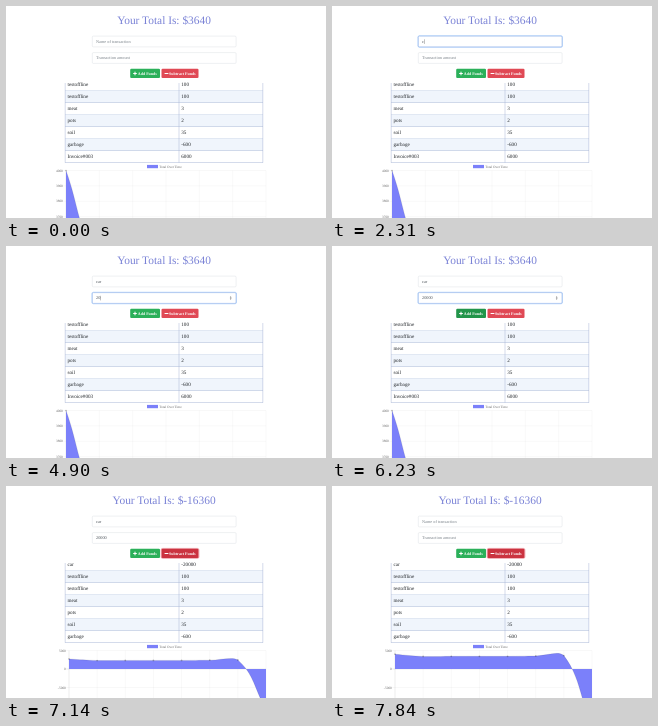
Animation, 320 px wide and 212 px high, one loop 8000 ms. Source, as an HTML page:

```html
<!DOCTYPE html>
<html lang="en">
<head>
<meta charset="utf-8">
<style>
  html, body { margin: 0; width: 100%; height: 100%; overflow: hidden; background: #fff; }
  svg { display: block; width: 100%; height: 100%; }
  text { font-family: "Liberation Serif", serif; text-rendering: geometricPrecision; white-space: pre; }
</style>
</head>
<body>
<svg id="stage" viewBox="0 0 320 212"></svg>
<script>
const LOOP = 8000, BLUR = 6790, POSTED = 6930, CLEARED = 7350;
const stage = document.getElementById('stage');

const clamp = v => Math.min(1, Math.max(0, v));
const between = (t, a, b) => t >= a && t < b;
const smooth = v => { v = clamp(v); return v * v * (3 - 2 * v); };
const focusLevel = (t, from, to) => smooth((t - from + 40) / 150) - smooth((t - to + 40) / 150);

const text = (x, y, size, fill, str, extra = '') =>
  `<text x="${x}" y="${y}" font-size="${size}" fill="${fill}" ${extra}>${str}</text>`;
const rect = (x, y, w, h, fill, extra = '') =>
  `<rect x="${x}" y="${y}" width="${w}" height="${h}" fill="${fill}" ${extra}/>`;
const path = (d, stroke, width, fill = 'none') =>
  `<path d="${d}" stroke="${stroke}" stroke-width="${width}" fill="${fill}"/>`;

// Number of characters typed so far, one per key time
const typed = (t, word, times) =>
  t >= CLEARED ? '' : word.slice(0, times.filter(k => t >= k).length);

function input(y, placeholder, value, focus, caret) {
  const advance = { c: .444, a: .444, r: .333 };
  const caretX = 90.1 + 4.28 * [...value].reduce((sum, ch) => sum + (advance[ch] || .5), 0);
  let out = '';
  if (focus > 0) out += rect(85.9, y - .4, 144.6, 11.6, 'none',
    `rx="1.5" stroke="#007bff" stroke-opacity="${.25 * focus}" stroke-width=".9"`);
  out += rect(86.3, y, 143.8, 10.8, '#fff', 'rx="1.1" stroke="#ced4da" stroke-width=".35"');
  if (focus > 0) out += rect(86.3, y, 143.8, 10.8, 'none',
    `rx="1.1" stroke="#80a8f0" stroke-opacity="${focus}" stroke-width=".5"`);
  out += text(90, y + 6.8, 4.28, value ? '#495057' : '#7b838a', value || placeholder);
  if (caret) out += rect(caretX, y + 3.2, .3, 4.6, '#333');
  return out;
}

function form(t) {
  const name = typed(t, 'car', [2310, 2520, 2730]);
  const amount = typed(t, '20000', [4550, 4900, 5040, 5180, 5390]);
  const nameCaret = between(t, 1610, 2170) || between(t, 2310, 3220);
  const amountCaret = between(t, 980, 1470) || between(t, 3220, 3780) ||
    between(t, 4340, 5880) || between(t, 6440, BLUR);
  const spinner = between(t, 980, 1680) || between(t, 2940, BLUR);
  return input(30.1, 'Name of transaction', name, focusLevel(t, 1610, 3220), nameCaret) +
    input(46.6, 'Transaction amount', amount,
      focusLevel(t, 980, 1610) + focusLevel(t, 3220, BLUR + 40), amountCaret) +
    (spinner ? path('M223.8 51.4l.9-1.1l.9 1.1zM223.8 52.6l.9 1.1l.9-1.1z', 'none', 0, '#666') : '');
}

function button(x, w, fill, label, icon, ring) {
  return (ring ? rect(x - .4, 62.4, w + .8, 10, 'none',
      'rx="1.5" stroke="#dc3545" stroke-opacity=".45" stroke-width=".9"') : '') +
    rect(x, 62.8, w, 9.2, fill, 'rx="1.1"') +
    path(icon, '#fff', 1) +
    text(x + 7.6, 68.8, 4, '#fff', label, 'font-weight="bold"');
}

function buttons(t) {
  const addHover = between(t, 6230, 6580), subHover = t >= 6580;
  return button(124.2, 29.8, addHover ? '#22954a' : '#2bb05a', 'Add Funds',
      'M127.2 67.5h3.6M129 65.7v3.6') +
    button(155.5, 37, subHover ? '#cb3340' : '#e04955', 'Subtract Funds',
      'M158.6 67.5h3.8', t >= BLUR + 40);
}

function table(t) {
  const history = [['car', '-20000'], ['testoffline', 100], ['testoffline', 100], ['meat', 3],
    ['pots', 2], ['soil', 35], ['garbage', -600], ['Invoice#003', 6000]];
  const first = t < POSTED ? 1 : 0;
  let out = '';
  history.slice(first, first + 7).forEach(([label, value], i) => {
    const bottom = 84.5 + 12 * i;
    if (i % 2) out += rect(59, bottom - 12, 198, 12, '#f0f5fc');
    out += text(61.5, bottom - 4.2, 5.13, '#212529', label) +
      text(175.3, bottom - 4.2, 5.13, '#212529', value) +
      path(`M59 ${bottom}H257`, '#a9b7d6', .5);
  });
  return out + path('M59.2 77V156.7M173 77V156.7M256.8 77V156.7', '#a9b7d6', .5);
}

// Smooth curve whose handles follow the neighbouring points
function curve(pts, top, bottom) {
  const cap = y => Math.min(bottom, Math.max(top, y));
  const handles = pts.map((p, i) => {
    const prev = pts[i - 1] || p, next = pts[i + 1] || p;
    const before = Math.hypot(p[0] - prev[0], p[1] - prev[1]);
    const after = Math.hypot(next[0] - p[0], next[1] - p[1]);
    const at = k => [p[0] + k * (next[0] - prev[0]), cap(p[1] + k * (next[1] - prev[1]))];
    return { into: at(-.4 * before / (before + after)), out: at(.4 * after / (before + after)) };
  });
  return pts.slice(1).map((p, i) => [handles[i].out, handles[i + 1].into, p]);
}

function chart(t) {
  const top = 164.5, bottom = 257, right = 260;
  const posted = t >= POSTED;
  const values = [4000, 3400, 3435, 3437, 3440, 3540, 3640];
  if (posted) values.push(-16360);
  const [max, min, step, left] = posted ? [5000, -20000, 5000, 63] : [4000, 3400, 100, 60];
  const toY = v => top + (max - v) / (max - min) * (bottom - top);
  const toX = i => left + i * (right - left) / (values.length - 1);
  const base = toY(Math.max(0, min));
  const grow = posted ? 1 - (1 - clamp((t - 6895) / 1000)) ** 4 : 1;
  const rise = ([x, y]) => [x, base + (y - base) * grow];
  const show = p => rise(p).map(n => n.toFixed(2)).join(' ');

  const pts = values.map((v, i) => [toX(i), toY(v)]);
  const line = curve(pts, top, bottom).map(seg => 'C' + seg.map(show).join(' ')).join('');
  let out = '';
  for (let v = max; v >= min; v -= step) {
    const y = toY(v);
    out += path(`M${left - 2.8} ${y}H${right}`, v ? '#00000018' : '#00000040', .3) +
      text(left - 3.2, y + 1.1, 3.42, '#666', v, 'text-anchor="end"');
  }
  pts.forEach(([x], i) => out += path(`M${x} ${top}V${bottom}`, i ? '#00000018' : '#00000040', .3));
  out += path(`M${left} ${base}L${show(pts[0])}${line}L${right} ${base}Z`, 'none', 0, '#7b80fa');
  out += path(`M${show(pts[0])}${line}`, '#0000001a', .86);
  for (const p of pts) {
    const [x, y] = rise(p);
    out += `<circle cx="${x}" cy="${y}" r=".86" fill="#00000040"/>`;
  }
  return out + rect(141, 158.9, 11, 3.3, '#7b80fa') +
    text(153.2, 161.7, 3.42, '#666', 'Total Over Time');
}

function draw(now) {
  const t = now % LOOP;
  const total = t < POSTED ? '3640' : '-16360';
  stage.innerHTML =
    text(158, 17.7, 11.4, '#7a82d6', 'Your Total Is: $' + total, 'text-anchor="middle"') +
    form(t) + buttons(t) + table(t) + chart(t);
}

const start = performance.now();
function tick() {
  draw(performance.now() - start);
  requestAnimationFrame(tick);
}
tick();
</script>
</body>
</html>
```
